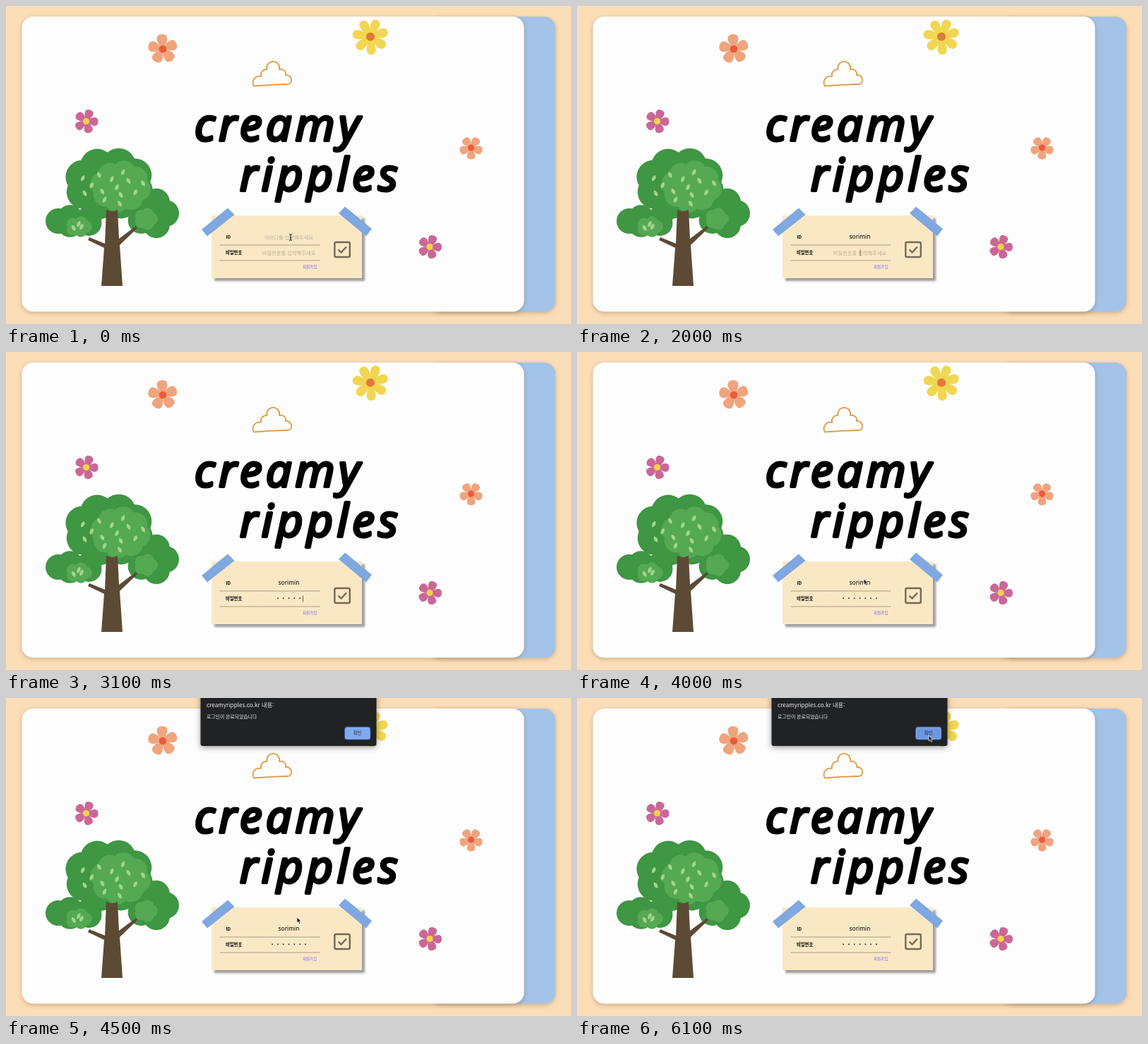
An HTML page that plays this animation: 800 px wide and 451 px high, repeating every 6.2 s.

```html
<!DOCTYPE html>
<html lang="ko">
<head>
<meta charset="utf-8">
<title>creamy ripples</title>
<style>
  html, body { margin: 0; width: 100%; height: 100%; overflow: hidden; background: #fbddb8; }
  svg { display: block; width: 100%; height: 100%; }
  text { font-family: "Noto Sans CJK KR", "Noto Sans", sans-serif; }
  .title { font: italic 400 64px "Open Sans", "Noto Sans", sans-serif; letter-spacing: 5.5px;
           stroke: #000; stroke-width: 4px; stroke-linejoin: round; }
  .label { font-size: 6.3px; font-weight: 700; }
  .field { font-size: 7.3px; text-anchor: middle; }
  .hint { fill: #b9ae9b; }
  #user { font-family: "Noto Sans", sans-serif; font-size: 8.4px; }
  .rule { stroke: #5f543f; stroke-width: 1; stroke-dasharray: 1 1; }
  .shade { filter: drop-shadow(0 2px 3px rgba(110, 75, 30, .32)); }
  .note { filter: drop-shadow(4px 4px 1.5px rgba(60, 60, 60, .5)); }
  .sheet { filter: drop-shadow(0 2px 4px rgba(0, 0, 0, .4)); }
</style>
</head>
<body>
<svg viewBox="0 0 800 451" preserveAspectRatio="none">
  <rect class="shade" x="600" y="15" width="178" height="418.5" rx="16" fill="#a4c3e8"/>
  <rect class="shade" x="22.5" y="15" width="711" height="418.5" rx="16" fill="#fdfdfd"/>

  <g id="tree"></g>
  <g id="flowers"></g>
  <path fill="none" stroke="#e09a45" stroke-width="1.8" stroke-linecap="round" stroke-linejoin="round"
    d="M351 113.5A9 9 0 0 1 361 100A8 8 0 0 1 369.5 90A9 9 0 1 1 387 90A7 7 0 0 1 396 98A7.2 7.2 0 0 1 403 109Q401 111.5 397 111Q374 111.500 351 113.500"/>

  <text class="title" x="267" y="191">creamy</text>
  <text class="title" x="331" y="262">ripples</text>

  <rect class="note" x="291" y="297" width="213" height="89" fill="#fae8c5"/>
  <g fill="#7fa8e0">
    <path d="M277 317L314 286.5L323.5 296L285 326.5Z"/>
    <path d="M480 284.5L518 316L510 326.5L471 294Z"/>
  </g>
  <path class="rule" d="M303 339H445M303 361H445"/>
  <text class="label" x="311.5" y="330">ID</text>
  <text class="label" x="311" y="352.3">비밀번호</text>
  <text x="420" y="372" font-size="5.5" fill="#7b62ee">회원가입</text>
  <g fill="none" stroke="#756952" stroke-width="2.4">
    <rect x="465.3" y="335" width="21.5" height="21" rx="2"/>
    <path d="M470.5 345.5L474.5 349.5L482 341.5"/>
  </g>

  <text id="userHint" class="field hint" x="400.5" y="330.5">아이디를 입력해주세요</text>
  <text id="passHint" class="field hint" x="400.5" y="352.5">비밀번호를 입력해주세요</text>
  <text id="user" class="field" x="400.5" y="330.3"></text>
  <g id="dots" fill="#3c3832"></g>
  <path id="caret" d="M0 -4.5V4.5" stroke="#444" stroke-width=".8"/>

  <g id="dialog">
    <path id="panel" class="sheet" fill="#202224"/>
    <g fill="#e8eaed">
      <text x="284" y="13" font-size="8.2">creamyripples.co.kr 내용:</text>
      <text x="284" y="29.2" font-size="6.85">로그인이 완료되었습니다</text>
    </g>
    <rect x="479" y="40.5" width="37.5" height="19" rx="3.5" fill="#30589c"/>
    <rect id="ok" x="480.5" y="42" width="34.5" height="16" rx="2.5" stroke="#9fc0f8" stroke-width=".8"/>
    <text x="497.5" y="52.3" font-size="6.3" text-anchor="middle" fill="#202224">확인</text>
  </g>

  <path id="beam" fill="none" stroke="#222"
    d="M-2 -4.5Q0 -4.5 0 -3Q0 -4.5 2 -4.5M0 -3V3M-2 4.5Q0 4.5 0 3Q0 4.5 2 4.5M-1 1H1"/>
  <path id="arrow" fill="#111" stroke="#fff" stroke-width=".7" d="M0 0V8L1.9 6.3L3.2 9.2L4.7 8.5L3.4 5.7H6Z"/>
</svg>

<script>
const LOOP = 6200, STEP = 100, MID = 400.5, DOT_GAP = 7.8;
const $ = id => document.getElementById(id);
const show = (el, on) => el.style.display = on ? "" : "none";
const clamp = v => Math.min(1, Math.max(0, v));
const repeat = (n, draw) => Array.from({ length: n }, (_, i) => draw(i)).join("");

function flower(x, y, count, reach, fill, core, turn) {
  const r = reach, w = r * 2 / count;
  const petal = `M0 0C${r * .3} ${-w * .6} ${r * .55} ${-w} ${r * .82} ${-w * .85}` +
    `C${r * 1.06} ${-w * .6} ${r * 1.06} ${w * .6} ${r * .82} ${w * .85}C${r * .55} ${w} ${r * .3} ${w * .6} 0 0`;
  return `<g transform="translate(${x} ${y})" fill="${fill}">` +
    repeat(count, i => `<path d="${petal}" transform="rotate(${turn + i * 360 / count})"/>`) +
    `<circle r="${1.5 + r * .18}" fill="${core}"/></g>`;
}

// A ring of round lobes about an ellipse
function puff(fill, cx, cy, rx, ry, r, count, turn = 0) {
  return `<g fill="${fill}"><ellipse cx="${cx}" cy="${cy}" rx="${rx + r / 2}" ry="${ry + r / 2}"/>` +
    repeat(count, i => {
      const a = (turn + i * 360 / count) * Math.PI / 180;
      return `<circle cx="${cx + rx * Math.cos(a)}" cy="${cy + ry * Math.sin(a)}" r="${r}"/>`;
    }) + "</g>";
}

// Small leaves spread by the golden angle
function leaves(cx, cy, rx, ry, count) {
  return repeat(count, i => {
    const a = i * 2.4, d = Math.sqrt((i + .5) / count);
    const x = cx + rx * d * Math.cos(a), y = cy + ry * d * Math.sin(a);
    return `<path fill="#a3d58d" d="M-5 0Q0 -5 5 0Q0 5 -5 0" transform="translate(${x} ${y}) rotate(${i % 2 ? 60 : 115})"/>`;
  });
}

const ORANGE = ["#f0a47d", "#ec5a3c"], PINK = ["#cb6796", "#f3d24b"], YELLOW = ["#f2d652", "#e07a3a"];
$("flowers").innerHTML =
  flower(222, 61, 5, 21, ...ORANGE, -94) +
  flower(658.5, 201, 5, 16.5, ...ORANGE, 90) +
  flower(113.5, 163.5, 5, 17, ...PINK, -70) +
  flower(600, 341.5, 5, 17, ...PINK, -70) +
  flower(516, 43.5, 7, 25.5, ...YELLOW, -68);

const DARK = "#3f9643", LIGHT = "#54a952";
$("tree").innerHTML =
  puff(DARK, 146, 252, 40, 28, 24, 8, -115) +
  puff(DARK, 98, 305, 24, 5, 18, 5, 180) +
  puff(DARK, 207, 294, 19, 17, 19, 5) +
  puff(LIGHT, 162, 256, 26, 20, 17, 8, -80) +
  puff(LIGHT, 103, 313, 10, 6, 9, 5) +
  puff(LIGHT, 198, 302, 8, 7, 9, 5) +
  `<path fill="#5d4a35" d="M135 397L139 343L116 332L118 328L140 337L142 289Q150 293 158 289L160 330L184 312L186 315L161 339L165 397Z"/>` +
  leaves(148, 257, 48, 27, 14) + leaves(102, 313, 12, 4, 3);

const name = "sorimin";
const typed = (t, start, gap) => Math.min(name.length, Math.max(0, Math.floor((t - start) / gap) + 1));

function drawFields(t) {
  const n = typed(t, 660, 140), p = typed(t, 2330, 170);
  $("user").textContent = name.slice(0, n);
  show($("userHint"), !n);
  show($("passHint"), !p);
  $("dots").innerHTML = repeat(p, i =>
    `<circle cx="${MID + (i - (p - 1) / 2) * DOT_GAP}" cy="349.3" r=".95"/>`);

  const onPass = t >= 1800;
  const width = onPass ? p * DOT_GAP : n ? $("user").getComputedTextLength() : 0;
  $("caret").setAttribute("transform", `translate(${MID + width / 2 + .5} ${onPass ? 350 : 328})`);
  show($("caret"), t >= 400 && t < 3900);
}

function drawDialog(t) {
  const p = clamp((t - 4200) / 200), q = 1 - p;
  const left = 275.5 - 7 * q, right = 524.5 + 5 * q;
  show($("dialog"), p > 0);
  $("dialog").setAttribute("opacity", p);
  $("dialog").setAttribute("transform", `translate(${33 * q} ${-13 * q}) scale(${1 - .08 * q})`);
  $("panel").setAttribute("d",
    `M275.5 -10H524.5L${right} 65Q${right} 68 ${right - 3} 68H${left + 3}Q${left} 68 ${left} 65Z`);
  $("ok").setAttribute("fill", t >= 6000 ? "#6d97e0" : "#80a9ee");
}

function drawPointer(t) {
  const ease = (from, to) => { const u = clamp((t - from) / (to - from)); return u * u * (3 - 2 * u); };
  const lift = ease(3800, 4300), cross = ease(4500, 5100), reach = ease(5100, 5600);
  const x = 403 + 9 * lift + 79.5 * cross + 6.5 * reach;
  const y = 328 - 17 * lift - 218 * cross - 40 * reach;
  for (const id of ["beam", "arrow"]) $(id).setAttribute("transform", `translate(${x} ${y})`);
  show($("beam"), t < 700);
  show($("arrow"), t >= 4000);
}

const start = performance.now();
function frame(now) {
  const t = Math.floor(Math.max(0, now - start) % LOOP / STEP) * STEP;
  drawFields(t);
  drawDialog(t);
  drawPointer(t);
  requestAnimationFrame(frame);
}
frame(start);
</script>
</body>
</html>
```
